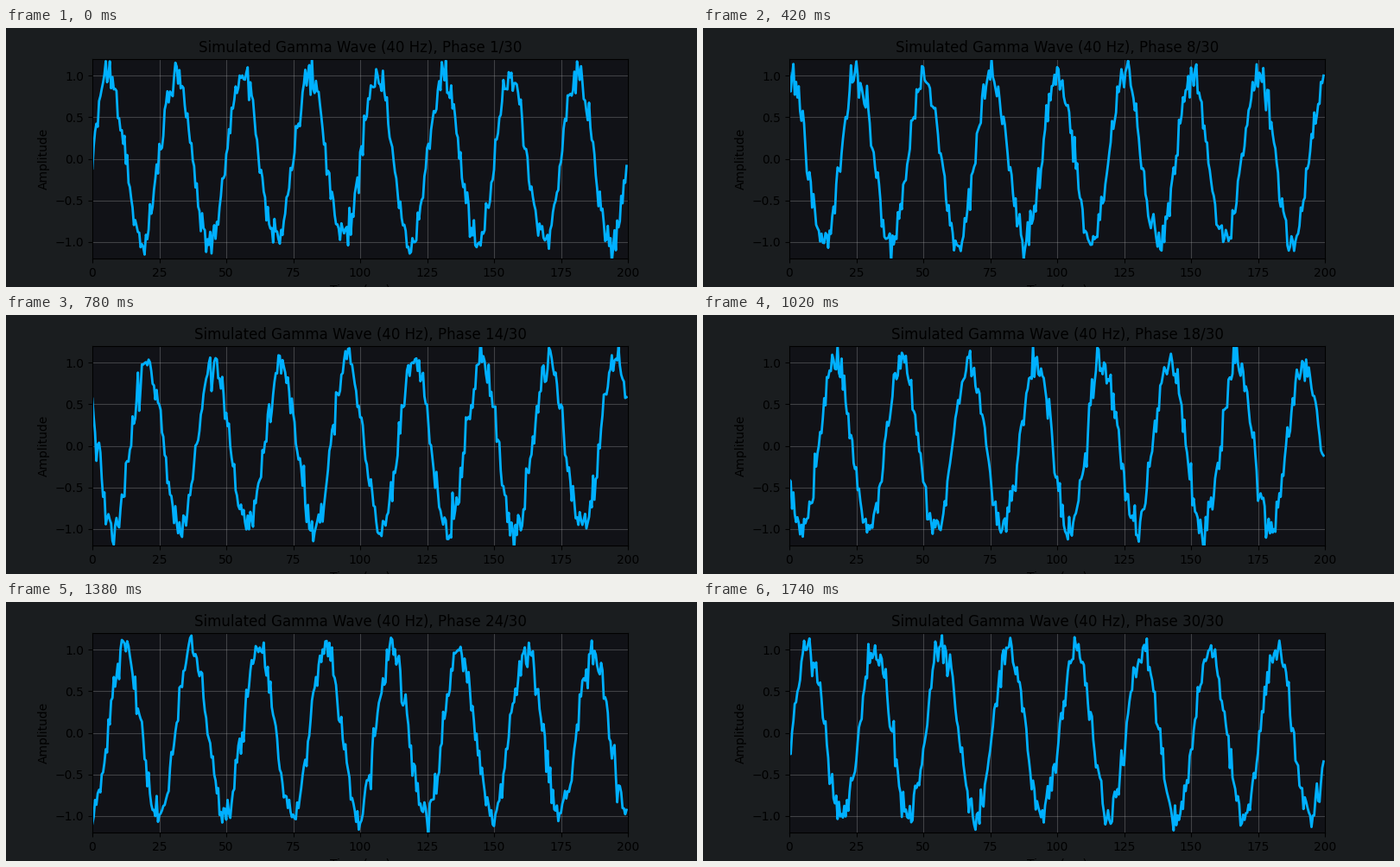
A matplotlib script that plays this animation: 800 px wide and 300 px high, repeating every 1.8 s.

```python
import numpy as np
import matplotlib.pyplot as plt
from matplotlib.animation import FuncAnimation

FRAMES = 30
STEP_MS = 60
FREQ_HZ = 40
NOISE = 0.1

t = np.arange(0, 200, 0.5)  # milliseconds

fig, ax = plt.subplots(figsize=(8, 3), dpi=100, facecolor="#1a1d1f")
ax.set_facecolor("#111217")
ax.set_xlim(0, 200)
ax.set_ylim(-1.2, 1.2)
ax.set_xlabel("Time (ms)")
ax.set_ylabel("Amplitude")
ax.grid(True, alpha=0.3)
line, = ax.plot([], [], color="#00b0ff", lw=2)


def wave(i):
    rng = np.random.default_rng(100 + i)
    phase = 2 * np.pi * i / FRAMES
    clean = np.sin(2 * np.pi * FREQ_HZ * t / 1000 + phase)
    return clean + NOISE * rng.standard_normal(t.size)


def update(i):
    line.set_data(t, wave(i))
    ax.set_title(f"Simulated Gamma Wave ({FREQ_HZ} Hz), Phase {i + 1}/{FRAMES}")
    return line,


anim = FuncAnimation(fig, update, frames=FRAMES, interval=STEP_MS,
                     repeat=True, repeat_delay=0)
plt.show()
```
